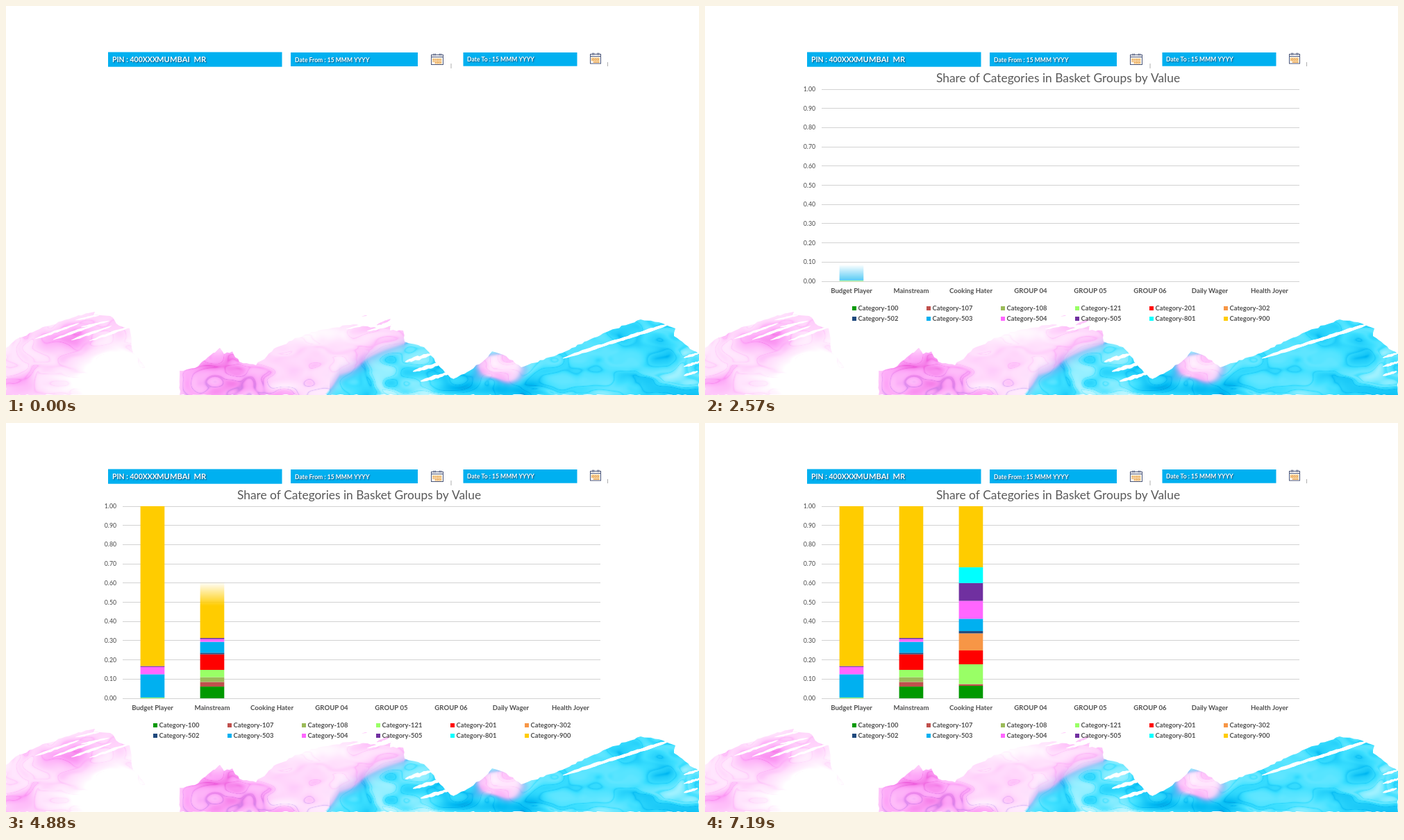
Write an HTML page with a canvas that moves like this. It is 998 px wide and 561 px high and loops after 8000 ms.

```html
<!DOCTYPE html>
<html lang="en">
<head>
<meta charset="utf-8">
<title>Share of Categories</title>
<style>
html, body { margin: 0; width: 100%; height: 100%; overflow: hidden; background: #fff; }
canvas { display: block; width: 100vw; height: 100vh; }
</style>
</head>
<body>
<canvas id="stage" width="998" height="561"></canvas>
<script>
const W = 998, H = 561, LOOP = 8000, STEP = 40;
const FONT = 'Lato, sans-serif';
const COLORS = ['#009900', '#c0504d', '#9bbb59', '#99ff66', '#ff0000', '#f79646',
  '#1f497d', '#00b0f0', '#ff66ff', '#7030a0', '#00ffff', '#ffcc00'];
const CODES = [100, 107, 108, 121, 201, 302, 502, 503, 504, 505, 801, 900];
const GROUPS = ['Budget Player', 'Mainstream', 'Cooking Hater', 'GROUP 04',
  'GROUP 05', 'GROUP 06', 'Daily Wager', 'Health Joyer'];
// Running totals: category index -> upper end of its share
const STACKS = [
  { 3: .004, 7: .125, 8: .163, 9: .168, 11: 1 },
  { 0: .061, 1: .085, 2: .11, 3: .148, 4: .229, 6: .237, 7: .294, 8: .308, 9: .314, 11: 1 },
  { 0: .065, 1: .074, 3: .177, 4: .249, 5: .338, 6: .35, 7: .414, 8: .507, 9: .6, 10: .682, 11: 1 }
];
const PLOT = { left: 168, right: 856, top: 120, bottom: 397 };

function layer(draw) {
  const c = document.createElement('canvas');
  c.width = W;
  c.height = H;
  draw(c.getContext('2d'));
  return c;
}

function label(g, text, x, y, size, weight = 400, align = 'left', color = '#595959') {
  g.font = `${weight} ${size}px ${FONT}`;
  g.textAlign = align;
  g.fillStyle = color;
  g.fillText(text, x, y);
}

const clamp = (v, lo = 0, hi = 1) => Math.min(hi, Math.max(lo, v));
const mix = (a, b, t) => a + (b - a) * t;
const smooth = t => t * t * (3 - 2 * t);

// ---- painted background ----

function hash(x, y) {
  let n = Math.imul(x, 374761393) + Math.imul(y, 668265263);
  n = Math.imul(n ^ (n >>> 13), 1274126177);
  return ((n ^ (n >>> 16)) >>> 0) / 4294967296;
}

function noise(x, y) {
  const ix = Math.floor(x), iy = Math.floor(y);
  const u = smooth(x - ix), v = smooth(y - iy);
  return mix(mix(hash(ix, iy), hash(ix + 1, iy), u),
    mix(hash(ix, iy + 1), hash(ix + 1, iy + 1), u), v);
}

const fbm = (x, y) => .67 * noise(x, y) + .33 * noise(2 * x + 9, 2 * y + 5);

let seed = 11;
function rand() {
  seed = (Math.imul(seed, 1664525) + 1013904223) >>> 0;
  return seed / 4294967296;
}

const hex = s => [1, 3, 5].map(i => parseInt(s.slice(i, i + 2), 16));
const PINK = ['#ffffff', '#ffdefc', '#fda4f7', '#ec54d8'].map(hex);
const CYAN = ['#ffffff', '#b0f4ff', '#3cdfff', '#00b8f2', '#0e70be'].map(hex);
const VIOLET = hex('#9292ee');
// x, y, radius x, radius y, change of depth
const SPOTS = [
  [95, 486, 45, 16, .28], [22, 546, 30, 18, .22], [160, 536, 52, 44, -1.1],
  [300, 512, 28, 16, .34], [450, 472, 65, 13, -.28], [340, 546, 50, 14, .16],
  [400, 549, 25, 7, -.25], [500, 542, 28, 18, -.16], [610, 545, 24, 14, -.25],
  [690, 553, 50, 9, .24], [755, 550, 18, 12, .3], [880, 551, 50, 12, -.14],
  [946, 488, 26, 18, .14]
];

// Upper edge of the violet-to-cyan border
const shoreY = x => x < 480 ? 528 - (x - 480) * 1.5 : x < 572 ? 528 - (x - 480) * .45 : 487 - (x - 572) * 1.7;

function ramp(stops, d) {
  const p = clamp(d) * (stops.length - 1);
  const i = Math.min(stops.length - 2, Math.floor(p));
  return stops[i].map((c, k) => mix(c, stops[i + 1][k], p - i));
}

function paintColor(x, y) {
  const wx = fbm(x / 55, y / 34) * 2.6, wy = fbm(x / 50 + 30, y / 30 + 7) * 2.6;
  const v = fbm(x / 75 + wx, y / 48 + wy);
  const vein = Math.pow(1 - Math.abs(2 * ((v * 5) % 1) - 1), 7);

  const off = y - shoreY(x) + (wx - 1.3) * 8;
  const patch = Math.hypot((x - 710) / 32, (y - 524) / 21) + (wy - 1.3) * .35;
  let cyan = x < 440 ? 0 : smooth(clamp(off / 8 + .5));
  cyan *= smooth(clamp((patch - .8) * 3));

  let add = (v - .5) * .75 + vein * .14;
  for (const [sx, sy, rx, ry, depth] of SPOTS) {
    const q = ((x - sx) / rx) ** 2 + ((y - sy) / ry) ** 2;
    if (q < 9) add += depth * Math.exp(-q);
  }
  const a = ramp(PINK, .43 + add), b = ramp(CYAN, .5 + add * .8);
  let violet = x > 460 && x < 600 ? .4 * Math.exp(-off * off / 120) : 0;
  if (x > 250 && x < 466) violet = vein * .3 * clamp((y - 520) / 30);
  if (Math.abs(x - 710) < 60) violet = .35 * Math.exp(-(((patch - 1) * 5) ** 2));
  return a.map((c, k) => mix(mix(c, b[k], cyan), VIOLET[k], violet));
}

// Closed outline with slightly torn sides
function torn(g, pts, rough = 1.6) {
  g.beginPath();
  pts.forEach(([x, y], i) => {
    const [x2, y2] = pts[(i + 1) % pts.length];
    const n = Math.max(1, Math.round(Math.hypot(x2 - x, y2 - y) / 5));
    for (let k = 0; k < n; k++) {
      const r = k ? rough : 0;
      g.lineTo(mix(x, x2, k / n) + (rand() - .5) * r, mix(y, y2, k / n) + (rand() - .5) * r);
    }
  });
  g.fill();
}

// Paint mass below a ragged crest
function mass(g, crest) {
  torn(g, [[crest[0][0], H], ...crest, [crest[crest.length - 1][0], H]], 2.4);
}

// Tapered dry-brush stroke
function brush(g, x1, y1, x2, y2, w) {
  const n = 14, side = [];
  for (let k = 0; k <= 2 * n; k++) {
    const s = k <= n ? k / n : 2 - k / n;
    const half = w / 2 * Math.sqrt(Math.sin(Math.PI * s) + .03) * (.6 + .6 * rand());
    side.push([mix(x1, x2, s), mix(y1, y2, s) + (k <= n ? -half : half)]);
  }
  torn(g, side);
}

// Parallel strokes, each shifted by dx, dy
function fan(g, x, y, dx, dy, length, rise, w, count) {
  for (let i = 0; i < count; i++) {
    const sx = x + dx * i, sy = y + dy * i, size = .85 + .3 * rand();
    brush(g, sx, sy, sx + length * size, sy - rise * size, w);
  }
}

const LEFT = [[0, 493], [14, 481], [48, 466], [100, 448], [128, 441], [126, 446], [150, 447],
  [163, 461], [178, 465], [183, 500], [200, 520]];
const MIDDLE = [[250, 526], [272, 522], [294, 504], [308, 493], [314, 502], [326, 498], [336, 513],
  [360, 518], [390, 492], [440, 470], [500, 459], [540, 465], [556, 459], [553, 468], [572, 468],
  [574, 484], [602, 492], [622, 517], [640, 536], [655, 545]];
const RIGHT = [[632, 545], [664, 528], [694, 506], [700, 498], [716, 503], [742, 521], [806, 498],
  [860, 472], [914, 452], [940, 456], [964, 465], [962, 476], [978, 488], [998, 502]];

const paint = layer(g => {
  const top = 432, img = g.createImageData(W, H - top);
  for (let y = top, p = 0; y < H; y++) {
    for (let x = 0; x < W; x++, p += 4) {
      img.data.set(paintColor(x, y), p);
      img.data[p + 3] = 255;
    }
  }
  g.putImageData(img, 0, top);
  g.globalCompositeOperation = 'destination-in';
  g.drawImage(layer(m => {
    [LEFT, MIDDLE, RIGHT].forEach(crest => mass(m, crest));
    m.globalCompositeOperation = 'destination-out';
    fan(m, 42, 480, 26, 1, 68, 24, 4, 4);
    fan(m, 100, 453, 8, 10, 42, 9, 3, 2);
    fan(m, 575, 513, 11, 14, 45, 13, 6, 3);
    fan(m, 490, 466, 30, 3, 44, 11, 3, 2);
    fan(m, 802, 508, 25, -8, 70, 23, 5, 5);
    fan(m, 976, 507, 0, 13, 24, 7, 4, 3);
    m.globalCompositeOperation = 'source-over';
    brush(m, 534, 460, 554, 452, 4);
    brush(m, 512, 448, 520, 446, 1);
  }), 0, 0);
});

// ---- header ----

function calendar(g, x, y, w, h) {
  g.strokeStyle = '#4a5578';
  g.lineWidth = 1;
  g.strokeRect(x + .5, y + 1.5, w - 1, h - 2);
  g.fillStyle = '#4a5578';
  g.fillRect(x, y + 4, w, 1);
  for (const s of [.2, .32, .65, .77]) g.fillRect(x + w * s, y - .5, 1, 3);
  g.strokeStyle = '#eda84e';
  g.lineWidth = .8;
  for (let r = 0; r < 3; r++) {
    for (let c = r > 1 ? 1 : 0; c < 4; c++) {
      g.strokeRect(x + w * (.15 + .185 * c), y + h * (.44 + .17 * r), w * .12, h * .1);
    }
  }
}

const base = layer(g => {
  g.fillStyle = '#fff';
  g.fillRect(0, 0, W, H);
  g.drawImage(paint, 0, 0);
  g.fillStyle = '#00b0f0';
  g.fillRect(147, 66.5, 250.5, 21.2);
  g.fillRect(410, 67, 183, 20);
  g.fillRect(658.5, 67, 164, 19.7);
  calendar(g, 612, 69, 18, 16);
  calendar(g, 841, 68, 16, 15.5);
  g.fillStyle = '#b0b0b0';
  g.fillRect(640.5, 83, 1, 7);
  g.fillRect(866, 81, 1, 6);
  g.shadowColor = 'rgba(0, 30, 60, .65)';
  g.shadowBlur = 1.5;
  g.shadowOffsetX = g.shadowOffsetY = 1;
  const head = (text, x, y, size) => label(g, text, x, y, size, 700, 'left', '#fff');
  head('PIN : 400XXX', 153, 81, 10.5);
  head('MUMBAI', 217, 81, 11.2);
  head('MR', 270.5, 81, 11.2);
  head('Date From : 15 MMM YYYY', 416, 80.5, 8.6);
  head('Date To : 15 MMM YYYY', 664, 80, 8.6);
});

// ---- chart ----

const groupX = i => PLOT.left + (PLOT.right - PLOT.left) * (i + .5) / GROUPS.length;
const valueY = v => mix(PLOT.bottom, PLOT.top, v);

const chart = layer(g => {
  label(g, 'Share of Categories in Basket Groups by Value', 508.5, 110, 17.35, 400, 'center');
  for (let i = 0; i <= 10; i++) {
    const y = valueY(i / 10);
    g.fillStyle = '#d2d2d2';
    g.fillRect(PLOT.left, Math.round(y - .5), PLOT.right - PLOT.left, 1);
    label(g, (i / 10).toFixed(2), 159, y + 3, 8.7, 400, 'right', '#484848');
  }
  GROUPS.forEach((name, i) => label(g, name, groupX(i), 413.7, 9.6, 700, 'center', '#505050'));
  CODES.forEach((code, i) => {
    const x = 212 + 107 * (i % 6), y = i < 6 ? 433 : 448;
    g.fillStyle = COLORS[i];
    g.fillRect(x, y, 6, 6);
    label(g, 'Category-' + code, x + 8.5, y + 6, 9.4, 700, 'left', '#505050');
  });
});

const bars = STACKS.map((stack, i) => layer(g => {
  let low = 0;
  for (const k of Object.keys(stack)) {
    const y = valueY(stack[k]);
    g.fillStyle = COLORS[k];
    g.fillRect(groupX(i) - 17.4, y, 34.7, valueY(low) - y);
    low = stack[k];
  }
}));

// ---- playback ----

const g = document.getElementById('stage').getContext('2d');
const temp = layer(() => {});
const tg = temp.getContext('2d');

// Reveal from the bottom with a soft upper edge
function wipe(src, top, bottom, p) {
  if (p <= 0) return;
  if (p >= 1) {
    g.drawImage(src, 0, 0);
    return;
  }
  const soft = (bottom - top) / 8;
  const edge = bottom - p * (bottom - top + soft);
  const fade = tg.createLinearGradient(0, edge, 0, edge + soft);
  fade.addColorStop(0, 'rgba(0, 0, 0, 0)');
  fade.addColorStop(1, '#000');
  tg.globalCompositeOperation = 'copy';
  tg.drawImage(src, 0, 0);
  tg.globalCompositeOperation = 'destination-in';
  tg.fillStyle = fade;
  tg.fillRect(0, 0, W, H);
  g.drawImage(temp, 0, 0);
}

const progress = (t, start, steps) => clamp((Math.floor((t - start) / STEP) + 1) / steps);

function frame(now) {
  const t = now % LOOP;
  g.drawImage(base, 0, 0);
  wipe(chart, 90, 463, progress(t, 500, 12));
  bars.forEach((bar, i) => wipe(bar, PLOT.top, PLOT.bottom, progress(t, 2570 + 2070 * i, 13)));
  requestAnimationFrame(frame);
}
requestAnimationFrame(frame);
</script>
</body>
</html>
```
